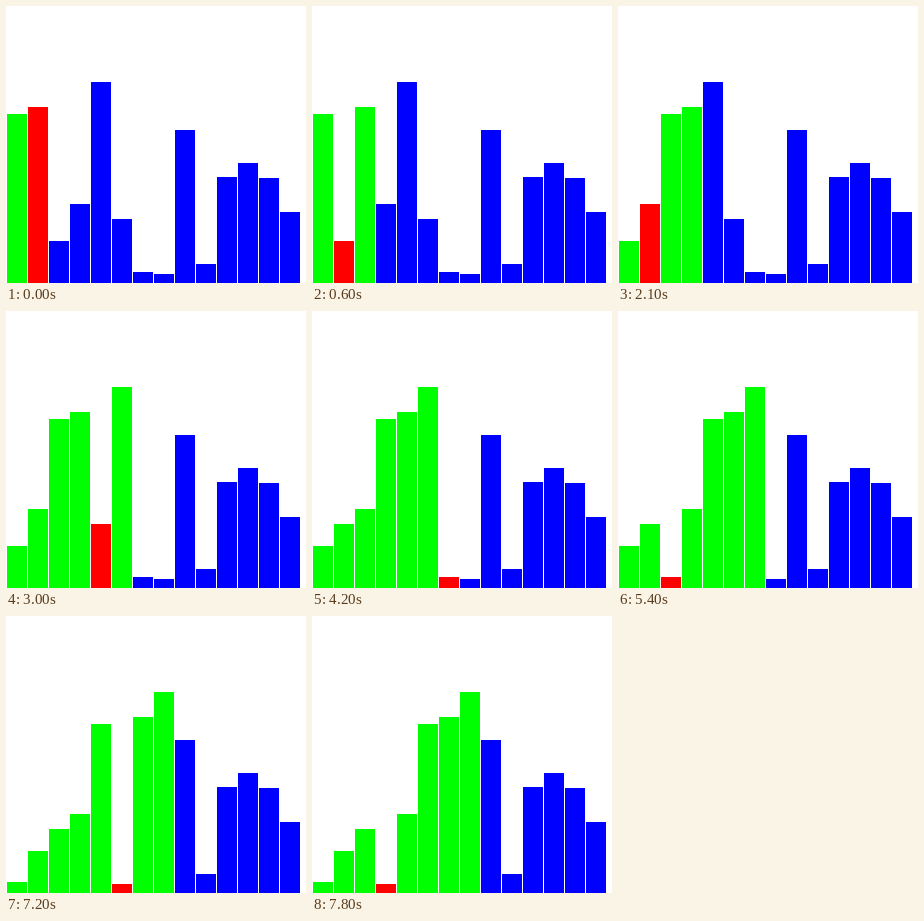
A matplotlib script that plays this animation: 300 by 277 pixels, repeating every 8 s.

```python
import matplotlib.pyplot as plt
from matplotlib.animation import FuncAnimation

WIDTH, HEIGHT, DPI = 300, 277, 64
PITCH, BAR_WIDTH = 21, 20
LOOP_MS, TICK_MS, STEP_MS = 8000, 100, 300
SORTED, ACTIVE, UNSORTED = "#00ff00", "#ff0000", "#0000ff"
VALUES = [169, 176, 42, 79, 201, 64, 11, 9, 153, 19, 106, 120, 105, 71]


def insertion_sort(values):
    """Yield (bar heights, end of sorted part, active bar) for every step."""
    bars = list(values)
    for end in range(1, len(bars)):
        pos = end
        yield bars[:], end, pos
        while pos > 0 and bars[pos - 1] > bars[pos]:
            bars[pos - 1], bars[pos] = bars[pos], bars[pos - 1]
            pos -= 1
            yield bars[:], end, pos
        if pos == 0:
            # Ran off the left edge: no bar is active for one step
            yield bars[:], end, None


def bar_color(index, end, active):
    if index == active:
        return ACTIVE
    return SORTED if index <= end else UNSORTED


steps = list(insertion_sort(VALUES))

fig = plt.figure(figsize=(WIDTH / DPI, HEIGHT / DPI), dpi=DPI, facecolor="white")
ax = fig.add_axes([0, 0, 1, 1])
ax.set_xlim(0, WIDTH)
ax.set_ylim(0, HEIGHT)
ax.axis("off")
lefts = [1 + PITCH * i for i in range(len(VALUES))]
rects = ax.bar(lefts, VALUES, width=BAR_WIDTH, align="edge",
               linewidth=0, antialiased=False)
ax.set_xlim(0, WIDTH)
ax.set_ylim(0, HEIGHT)


def draw(frame):
    bars, end, active = steps[frame * TICK_MS // STEP_MS]
    for i, (rect, height) in enumerate(zip(rects, bars)):
        rect.set_height(height)
        rect.set_facecolor(bar_color(i, end, active))
    return list(rects)


anim = FuncAnimation(fig, draw, frames=LOOP_MS // TICK_MS,
                     interval=TICK_MS, repeat=True)
plt.show()
```
